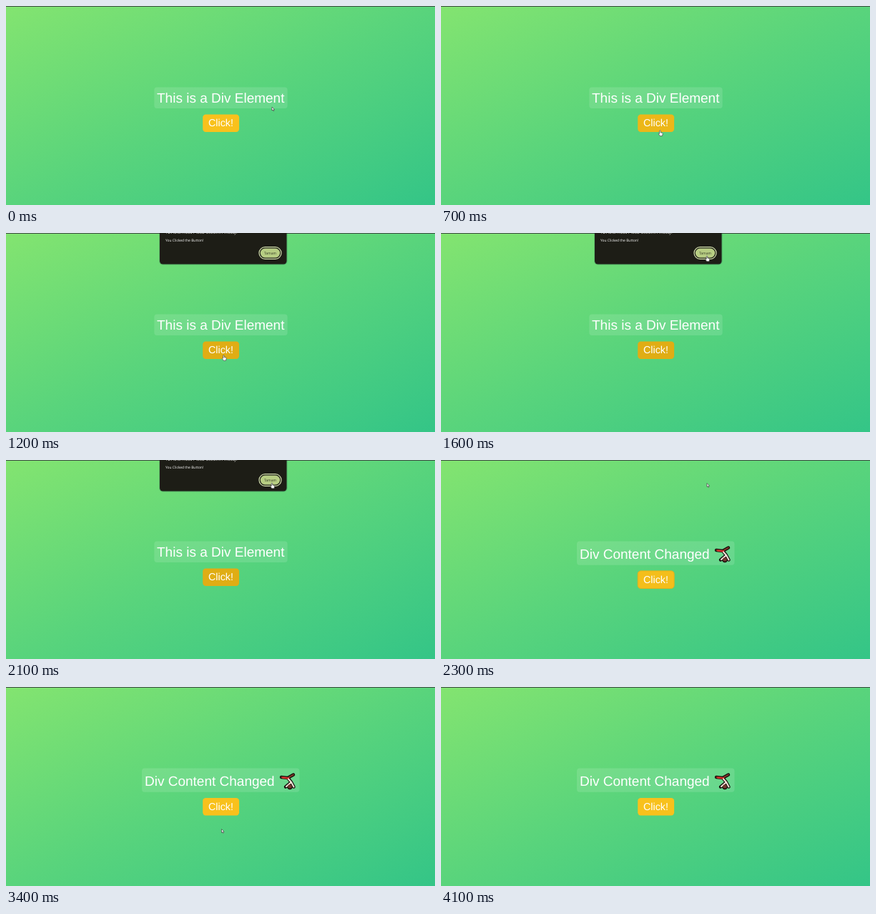
These frames come from a looping animation (600x278 px, 4.3 s). An HTML page:

```html
<!DOCTYPE html>
<html lang="en">
<head>
<meta charset="utf-8">
<title>Button click demo</title>
<style>
  html, body { margin: 0; width: 100%; height: 100%; overflow: hidden; }
  body { background: linear-gradient(to bottom right, #83e470, #59d47c 50%, #34c587); }
  svg { display: block; width: 600px; height: 278px; }
  text { font-family: "Liberation Sans", Arial, sans-serif; fill: #fff; text-rendering: geometricPrecision; }
  #title { font-size: 19px; }
  #label { font-size: 14.3px; }
  #dialog text { font: 4.95px "Open Sans", "Noto Sans", sans-serif; }
  #dialog .head { font-size: 6.1px; }
  #dialog .ok { fill: #303522; }
  #cursor path { fill: #fff; stroke: #444; stroke-width: .7; stroke-linejoin: round; }
</style>
</head>
<body>
<svg viewBox="0 0 600 278">
  <rect width="600" height="1" fill="#3d4a42"/>
  <rect id="box" y="113.5" rx="4" fill="#fff" fill-opacity=".12"/>
  <text id="title"></text>
  <g id="tumbler" fill="none" stroke-linecap="round" stroke-linejoin="round">
    <g stroke="#17100d" stroke-width="4.4">
      <path d="M385 126L394 127L402 122.5M394.5 127.5L399 133L402.5 139.5M399 133L391 139.5"/>
      <circle cx="397" cy="139" r="2"/>
    </g>
    <path d="M385 126L394 127L402 122.5" stroke="#8c3a2a" stroke-width="1.6"/>
    <path d="M387 126.5L395 127.5" stroke="#d5302b" stroke-width="2.4"/>
    <path d="M395 128.5L399 133L402.5 139.5M399 133L392 139" stroke="#f5e4da" stroke-width="2"/>
    <circle cx="397" cy="139" r="2.8" fill="#70382e"/>
  </g>
  <g id="button">
    <rect id="face" x="275.2" y="151.4" width="50.9" height="24.5" rx="4.2"/>
    <text id="label" x="283" y="168.2">Click!</text>
  </g>
  <g id="dialog">
    <rect x="214.2" y="-9.5" width="179.2" height="54" rx="5" fill="#123" fill-opacity=".25"/>
    <rect x="215" y="-10" width="177.5" height="53.6" rx="4.5" fill="#1d1d16"/>
    <text class="head" x="223" y="1.1">127.0.0.1:5501 web sitesinin mesajı</text>
    <text x="223" y="12.2">You Clicked the Button!</text>
    <rect x="354" y="19.7" width="31" height="16.6" rx="8.3" fill="none" stroke="#d3dfae" stroke-width="1.2"/>
    <rect x="355.8" y="21.5" width="27.4" height="13" rx="6.5" fill="#b7cd83"/>
    <text class="ok" x="361" y="29.8">Tamam</text>
  </g>
  <g id="cursor">
    <path id="arrow" d="M0 0V5L1.1 4L1.9 5.8L2.8 5.4L2 3.7H3.5Z"/>
    <path id="hand" d="M-.8 0Q0 -1 .7 0V2.4L3.2 3Q3.9 3.2 3.7 4.3L3 7.2H-.2L-2.2 4.4Q-2 3.4 -.8 4Z"/>
  </g>
</svg>
<script>
const LOOP = 4300, STEP = 100, CLICK = 900, CLOSE = 2200;
const $ = id => document.getElementById(id);
const set = (id, attrs) => { for (const k in attrs) $(id).setAttribute(k, attrs[k]); };
const show = (id, on) => set(id, { visibility: on ? 'visible' : 'hidden' });

const progress = (t, start, span) => Math.min(1, Math.max(0, (t - start) / span));
const ease = p => p * p * (3 - 2 * p);
const mix = (a, b, p) => a + (b - a) * p;
const within = (x, y, cx, cy, w, h) => Math.abs(x - cx) < w / 2 && Math.abs(y - cy) < h / 2;

const home = { x: 372, y: 141 };
const hops = [
  { start: 0, span: 600, x: 312, y: 184 },
  { start: 600, span: 150, x: 304.5, y: 171 },
  { start: 1200, span: 400, x: 372, y: 32.5 },
  { start: 2400, span: 600, x: 301.5, y: 198.5 },
  { start: 3400, span: 400, x: 250, y: 285 }
];

function pointerAt(t) {
  return hops.reduce((at, hop) => {
    const p = ease(progress(t, hop.start, hop.span));
    return { x: mix(at.x, hop.x, p), y: mix(at.y, hop.y, p) };
  }, home);
}

function draw(t) {
  const changed = t >= CLOSE, shift = changed ? 3.5 : 0;
  $('title').textContent = changed ? 'Div Content Changed' : 'This is a Div Element';
  set('title', changed ? { x: 194, y: 138.4 } : { x: 211, y: 135.4 });
  set('box', changed ? { x: 190, width: 220.5, height: 33.3 } : { x: 207.3, width: 186.4, height: 29.6 });
  show('tumbler', changed);
  set('button', { transform: `translate(0 ${shift})` });

  const hover = ease(progress(t, 600, 200)) - ease(progress(t, CLOSE - 50, 200));
  set('face', {
    fill: `rgb(${mix(248, 224, hover)},${mix(193, 173, hover)},${mix(28, 20, hover)})`,
    stroke: changed && hover > 0 ? '#e3b01c' : 'none'
  });

  const left = 1 - progress(t, CLICK, 160);
  set('dialog', { transform: `translate(0 ${-7.5 * left})`, opacity: changed ? 0 : 1 - left * left });

  const { x, y } = pointerAt(t);
  const hand = within(x, y, 300.5, 163.7 + shift, 51, 24.5) || (!changed && within(x, y, 369.5, 28, 31, 17));
  set('cursor', { transform: `translate(${x} ${y})` });
  show('hand', hand);
  show('arrow', !hand);
}

function tick() {
  draw(Math.floor(performance.now() % LOOP / STEP) * STEP);
  requestAnimationFrame(tick);
}
tick();
</script>
</body>
</html>
```
